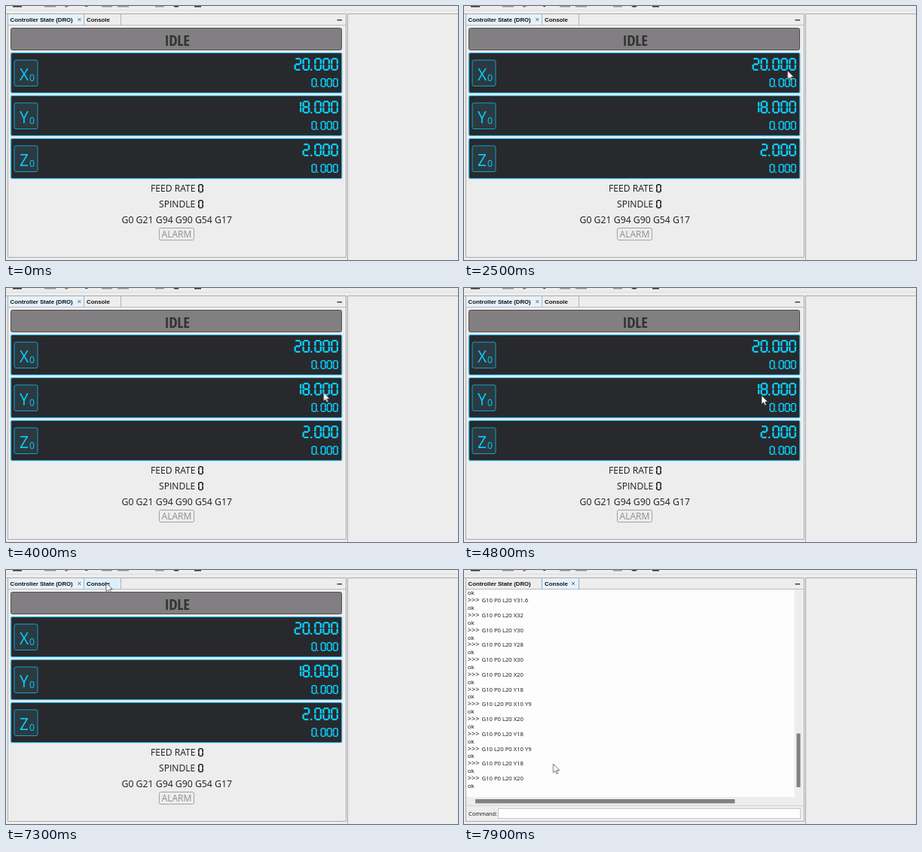
Recreate the animation shown at these times as an HTML page. Size 600 by 338 pixels, loop 8000 ms.

```html
<!DOCTYPE html>
<html lang="en">
<head>
<meta charset="utf-8">
<title>Controller state</title>
<style>
html, body { margin: 0; width: 100%; height: 100%; overflow: hidden; background: #eeedee; }
svg { display: block; width: 600px; height: 338px; font-family: "Open Sans", "Noto Sans", sans-serif; }
text { white-space: pre; }
.tab { font: bold 7.8px "Liberation Sans", Arial, sans-serif; fill: #111; }
.status {
  font: bold 20.5px "Open Sans Condensed", "Noto Sans Condensed", "Roboto Condensed", "Noto Sans CJK SC", sans-serif;
  font-stretch: condensed; letter-spacing: -.4px; fill: #333; text-anchor: middle;
}
.label { font-size: 12.1px; fill: #1c1c1c; }
.log { font-size: 7.7px; fill: #111; }
.digit { fill: none; stroke-width: 2.4; }
.lcd { stroke: #0accfa; fill: #0accfa; }
.ink { stroke: #1c1c1c; fill: #1c1c1c; }
.axis { fill: #0accfa; }

.page, .hover, .caret, #cursor { animation: 8s step-end infinite; }
.dro { animation-name: dro; }
.console { animation-name: console; }
.hover { animation-name: hover; }
.caret { animation-name: caret; }
#cursor { animation-name: move; }

@keyframes dro { 0% { visibility: visible; } 92.5%, 100% { visibility: hidden; } }
@keyframes console { 0% { visibility: hidden; } 92.5%, 100% { visibility: visible; } }
@keyframes hover { 0% { opacity: 0; } 88.75% { opacity: 1; } 92.5%, 100% { opacity: 0; } }
@keyframes caret { 0% { opacity: 0; } 92.5% { opacity: 1; } 98.75%, 100% { opacity: 0; } }
/* 1.25% is one 100 ms tick; steps(n) covers n ticks */
@keyframes move {
  0%     { transform: translate(620px, 160px); }
  7.5%   { transform: translate(543px, 131px); animation-timing-function: steps(2); }
  10%    { transform: translate(430px, 102px); animation-timing-function: steps(2); }
  12.5%  { transform: translate(360px, 87px); animation-timing-function: steps(2); }
  15%    { transform: translate(378px, 83px); }
  16.25% { transform: translate(378px, 83px); animation-timing-function: steps(3); }
  20%    { transform: translate(375px, 70px); animation-timing-function: steps(4); }
  25%    { transform: translate(436px, 86px); animation-timing-function: steps(2); }
  27.5%  { transform: translate(388px, 92px); animation-timing-function: steps(3); }
  31.25% { transform: translate(429.5px, 86px); animation-timing-function: steps(2); }
  33.75% { transform: translate(452px, 88px); }
  36.25% { transform: translate(452px, 88px); animation-timing-function: steps(4); }
  41.25% { transform: translate(384px, 140px); animation-timing-function: steps(3); }
  45%    { transform: translate(407px, 149px); animation-timing-function: steps(4); }
  50%    { transform: translate(421.5px, 139px); animation-timing-function: steps(4); }
  55%    { transform: translate(444px, 141px); animation-timing-function: steps(4); }
  60%    { transform: translate(395px, 143px); animation-timing-function: steps(3); }
  63.75% { transform: translate(378px, 200px); animation-timing-function: steps(2); }
  66.25% { transform: translate(440px, 209px); animation-timing-function: steps(3); }
  70%    { transform: translate(425px, 142px); }
  72.5%  { transform: translate(425px, 142px); animation-timing-function: steps(6); }
  78.75% { transform: translate(157.7px, 47px); animation-timing-function: steps(4); }
  83.75% { transform: translate(154px, 30px); animation-timing-function: steps(1); }
  85%    { transform: translate(160px, 22px); }
  86.25% { transform: translate(160px, 22px); animation-timing-function: steps(4); }
  91.25% { transform: translate(133px, 17px); }
  93.75% { transform: translate(133px, 17px); animation-timing-function: steps(3); }
  97.5%  { transform: translate(113px, 233px); animation-timing-function: steps(1); }
  98.75%, 100% { transform: translate(118.5px, 258px); }
}
</style>
</head>
<body>
<svg viewBox="0 0 600 338" xmlns="http://www.w3.org/2000/svg">
  <rect width="600" height="338" fill="#eeedee"/>

  <!-- lower edges of the toolbar icons -->
  <g fill="#333">
    <path d="M9 0h12v1.5H9zM222 0h8l-2 1.6h-4zM250 0h9v1.5h-9zM104 0h5l-2 1.3z"/>
    <path d="M51 0h15v1.5H51zM127 0h14v1.5h-14zM148 0h15v1.5h-15zM198 0h12v1.5h-12z" fill="#999"/>
    <path d="M78 0h6l-5 2z" fill="#8a7a50"/>
  </g>
  <path d="M0 5.5H600" stroke="#dededf"/>

  <!-- frames -->
  <path d="M0 10.5H451.5V334.5H2.5V10.5" fill="none" stroke="#a9a9ab"/>
  <path d="M600 10.5H453.5V338" fill="none" stroke="#a9a9ab"/>
  <path d="M3 25.5H451" stroke="#b9bcc0"/>
  <path d="M439.5 18.7h6.5" stroke="#333" stroke-width="1.4"/>

  <g class="page dro">
    <rect x="3" y="11" width="100" height="14" fill="#e6f2fb"/>
    <rect class="hover" x="104" y="11" width="48" height="14" fill="#dcf0fc"/>
    <path d="M103.5 11V25M152.5 11V25" stroke="#a9b4bd"/>
    <path d="M95.4 16l4 4m0-4l-4 4" stroke="#555" stroke-width=".9"/>
    <rect x="6.5" y="29.5" width="439" height="29" rx="2" fill="#827f82" stroke="#4e4e4e"/>
    <text class="status" x="227" y="53">IDLE</text>
    <g id="rows"></g>
    <text class="label" x="192" y="246.5">FEED RATE</text>
    <text class="label" x="203" y="267.5">SPINDLE</text>
    <text class="label" x="153.5" y="288.5" style="font-size:12.25px">G0 G21 G94 G90 G54 G17</text>
    <rect x="203.5" y="295.5" width="46" height="16" rx="2" fill="none" stroke="#a2a2a2"/>
    <text class="label" x="226.5" y="308" text-anchor="middle" style="fill:#8e8e8e">ALARM</text>
    <g id="counts" class="ink"></g>
  </g>

  <g class="page console">
    <rect x="104" y="11" width="48" height="14" fill="#e6f2fb"/>
    <path d="M103.5 11V25M152.5 11V25" stroke="#7fb4d6"/>
    <path d="M143 16l4 4m0-4l-4 4" stroke="#555" stroke-width=".9"/>
    <rect x="3" y="26" width="435.5" height="276" fill="#fdfdfe"/>
    <g id="log" class="log"></g>
    <rect x="441.5" y="217.5" width="5" height="71.5" fill="#828182"/>
    <rect x="15" y="305" width="344.5" height="5.5" fill="#828182"/>
    <path d="M3 313.5H451" stroke="#d4d4d6"/>
    <text class="log" x="6" y="327" style="font-size:7.4px">Command:</text>
    <rect x="45.5" y="317.5" width="401" height="13" fill="#fdfdfe" stroke="#c8c8ca"/>
    <path class="caret" d="M48.5 319V329" stroke="#222"/>
  </g>

  <text class="tab" x="5.5" y="21">Controller State (DRO)</text>
  <text class="tab" x="107" y="21">Console</text>

  <path id="cursor" d="M0 0V11.6L2.7 9.2 4.5 13.2 6.3 12.4 4.6 8.5H8.2Z" fill="#fff" stroke="#333" stroke-width=".7"/>
</svg>
<script>
const SEGMENTS = {
  a: "M1.9 1.2H8.1", b: "M8.8 1.9V8.6", c: "M8.8 9.4V16.1", d: "M1.9 16.8H8.1",
  e: "M1.2 9.4V16.1", f: "M1.2 1.9V8.6", g: "M2 9H8"
};
const DIGITS = { 0: "abcdef", 1: "bc", 2: "abged", 8: "abcdefg" };

const digit = (char, x, y, sx, sy) =>
  `<path class="digit" transform="translate(${x} ${y}) scale(${sx} ${sy})" d="${
    [...DIGITS[char]].map(s => SEGMENTS[s]).join("")}"/>`;

// Right-aligned segment readout; the point takes a narrow slot.
function readout(value, right, y, w, h, pitch, point) {
  let x = right - w, out = "";
  for (const char of [...value].reverse()) {
    if (char === ".") {
      const size = h / 7.5;
      out += `<rect x="${x + pitch - point - .4}" y="${y + h - size}" width="${size}" height="${size}" stroke="none"/>`;
      x -= point;
    } else {
      out += digit(char, x, y, w / 10, h / 18);
      x -= pitch;
    }
  }
  return `<g class="lcd" role="img" aria-label="${value}">${out}</g>`;
}

function row([axis, value], i) {
  const y = 62 + i * 57;
  return `<rect x="5.5" y="${y - .5}" width="441" height="55" rx="2" fill="none" stroke="#c9e6f3"/>
    <rect x="6.7" y="${y + .5}" width="439" height="53" rx="1.5" fill="#28292d" stroke="#27aedd"/>
    <rect x="11" y="${y + 10}" width="31" height="34.5" rx="2" fill="#2b3a41" stroke="#12a0cb"/>
    <text class="axis" x="18" y="${y + 36.5}" font-size="21">${axis}</text>
    <text class="axis" x="31" y="${y + 38.2}" font-size="12.2">0</text>
    ${readout(value, 441, y + 7, 9.8, 17, 11, 4.7)}
    ${readout("0.000", 441, y + 34, 7.3, 12, 8.1, 4)}`;
}

const fill = (id, html) => document.getElementById(id).innerHTML = html;

fill("rows", [["X", "20.000"], ["Y", "18.000"], ["Z", "2.000"]].map(row).join(""));
fill("counts", [237, 258].map(y => digit(0, 255, y, .7, .62)).join(""));

const pair = "G10 L20 P0 X10 Y9";
const set = ["Y31.6", "X32", "Y30", "Y28", "X30", "X20", "Y18", pair, "X20", "Y18", pair, "Y18", "X20"];
const STEP = 9.87;
const ok = y => `<text x="4.7" y="${y}" font-size="8">ok</text>`;
fill("log", ok(33.3) + set.map((word, i) => {
  const y = 33.3 + STEP * (2 * i + 1);
  const code = word === pair ? pair : "G10 P0 L20 " + word;
  return `<text x="4.7" y="${y}" font-size="9.2">&gt;&gt;&gt;</text><text x="23.5" y="${y}">${code}</text>` + ok(y + STEP);
}).join(""));
</script>
</body>
</html>
```
